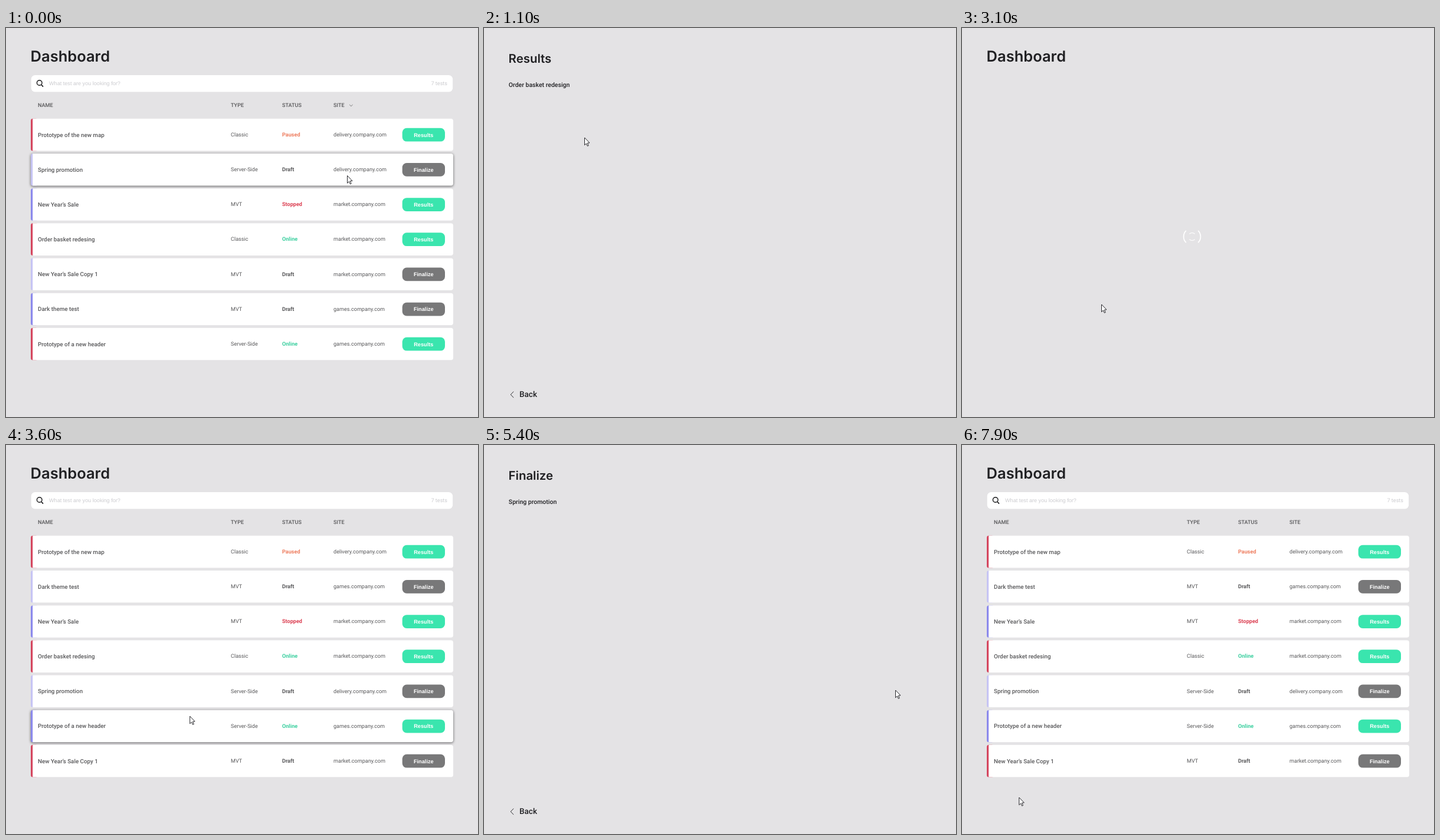
Recreate the animation shown at these times as an HTML page. Size 800 by 660 pixels, loop 8 s.

```html
<!DOCTYPE html>
<html lang="en">
<head>
<meta charset="utf-8">
<title>Dashboard</title>
<style>
  html, body { margin: 0; width: 100%; height: 100%; overflow: hidden; background: #e4e3e5; }
  svg { display: block; width: 800px; height: 660px; }
  text { text-rendering: geometricPrecision; fill: #58585a; font: 400 9.1px Roboto, sans-serif; }
  .title { font: 600 25.5px Inter, sans-serif; fill: #202023; }
  .heading { font: 600 20.4px Inter, sans-serif; fill: #202023; }
  .subject { font-size: 10.5px; font-weight: 500; fill: #222225; }
  .back { font-size: 13.5px; font-weight: 500; fill: #222225; }
  .head { font-weight: 500; }
  .name { font-size: 9.8px; font-weight: 500; }
  .status { font-weight: 600; }
  .label { font: 700 9.2px "Liberation Sans", Arial, sans-serif; fill: #fff; text-anchor: middle; }
  .hint { font: 400 9.1px "Liberation Sans", Arial, sans-serif; fill: #cbcbcf; }
  .count { fill: #cbcbcf; text-anchor: end; }
  .line { fill: none; stroke: #333336; }
  .row { filter: drop-shadow(0 .5px .5px rgba(0,0,0,.06)); }
  .row.hover { filter: drop-shadow(0 1px 2px rgba(0,0,0,.6)); }
  .ring { fill: none; stroke: #fff; stroke-dasharray: 1; }
  .cursor path { fill: #fff; stroke: #1c1c20; stroke-width: .95; stroke-linejoin: round; }
</style>
</head>
<body>
<svg id="stage" viewBox="0 0 800 660"></svg>
<script>
const LOOP = 8000, STEP = 100;
const ROW_TOP = 153.8, ROW_PITCH = 59.17, ROW_HEIGHT = 54.6;
const STRIPES = ['#d5465f', '#c6c4f4', '#8b89ec'];
const STATUS_COLORS = { Paused: '#ee7d5f', Stopped: '#dc4053', Online: '#3bcf9f', Draft: '#58585a' };
const stage = document.getElementById('stage');

const TESTS = {
  map: ['Prototype of the new map', 'Classic', 'Paused', 'delivery'],
  spring: ['Spring promotion', 'Server-Side', 'Draft', 'delivery'],
  sale: ['New Year\u2019s Sale', 'MVT', 'Stopped', 'market'],
  basket: ['Order basket redesing', 'Classic', 'Online', 'market'],
  copy: ['New Year\u2019s Sale Copy 1', 'MVT', 'Draft', 'market'],
  dark: ['Dark theme test', 'MVT', 'Draft', 'games'],
  header: ['Prototype of a new header', 'Server-Side', 'Online', 'games']
};

function add(parent, tag, attrs = {}, content) {
  const el = document.createElementNS('http://www.w3.org/2000/svg', tag);
  for (const key in attrs) el.setAttribute(key, attrs[key]);
  if (content) el.textContent = content;
  parent.append(el);
  return el;
}
const group = (parent, cls = '') => add(parent, 'g', { class: cls });
const text = (parent, cls, x, y, content) => add(parent, 'text', { class: cls, x, y }, content);
const show = (el, on) => { el.style.display = on ? '' : 'none'; };

function makeRow(parent, test, index) {
  const [name, type, status, site] = test;
  const y = ROW_TOP + index * ROW_PITCH;
  const row = group(parent, 'row');
  add(row, 'rect', { x: 42, y, width: 12, height: ROW_HEIGHT, rx: 3.5, fill: STRIPES[index % 3] });
  add(row, 'path', {
    d: `M45.2 ${y}H754q4 0 4 4v${ROW_HEIGHT - 8}q0 4-4 4H45.2z`, fill: '#fff'
  });
  text(row, 'name', 54, y + 30.7, name);
  text(row, '', 381, y + 30.1, type);
  text(row, 'status', 468, y + 30.1, status).style.fill = STATUS_COLORS[status];
  text(row, '', 555, y + 30.1, site + '.company.com');
  const draft = status === 'Draft';
  const button = add(row, 'rect', {
    x: 671.7, y: y + 16, width: 72.3, height: 22.8, rx: 7.5, fill: draft ? '#787879' : '#3ae5ae'
  });
  text(row, 'label', 707.8, y + 30.7, draft ? 'Finalize' : 'Results');
  return { row, button };
}

function makeList(keys, sorted) {
  const list = group(stage);
  add(list, 'rect', { class: 'row', x: 42.6, y: 80, width: 714.6, height: 28.4, rx: 6.5, fill: '#fff' });
  add(list, 'circle', { class: 'line', cx: 56.7, cy: 93, r: 4.3, 'stroke-width': 1.4, style: 'stroke:#161618' });
  add(list, 'path', { class: 'line', d: 'M59.8 96.2l3.2 3.4', 'stroke-width': 1.6, style: 'stroke:#161618' });
  text(list, 'hint', 73, 97.1, 'What test are you looking for?');
  text(list, 'count', 748, 97.1, '7 tests');
  [[54, 'NAME'], [381, 'TYPE'], [468, 'STATUS'], [555, 'SITE']]
    .forEach(([x, label]) => text(list, 'head', x, 134.3, label));
  if (sorted) add(list, 'path', { class: 'line', d: 'M582.2 130l2.7 2.7 2.7-2.7', style: 'stroke:#777' });
  const rows = keys.map((key, i) => makeRow(list, TESTS[key], i));
  return { list, rows };
}

function makeDetail(title, subject) {
  const page = group(stage);
  text(page, 'heading', 41.6, 59, title);
  text(page, 'subject', 41.8, 99.6, subject);
  add(page, 'path', { class: 'line', d: 'M50.2 616.8l-5 5.2 5 5.2' });
  text(page, 'back', 60, 626, 'Back');
  return page;
}

const title = text(stage, 'title', 41.6, 56.6, 'Dashboard');
const sortedList = makeList(['map', 'spring', 'sale', 'basket', 'copy', 'dark', 'header'], true);
const plainList = makeList(['map', 'dark', 'sale', 'basket', 'spring', 'header', 'copy'], false);
const results = makeDetail('Results', 'Order basket redesign');
const finalize = makeDetail('Finalize', 'Spring promotion');

const spinner = group(stage);
spinner.setAttribute('transform', 'translate(390 354)');
const makeRing = width => add(spinner, 'circle', { class: 'ring', pathLength: 4, 'stroke-width': width });
const outerRing = makeRing(1.7), innerRing = makeRing(1.2);

const cursor = group(stage, 'cursor');
const arrow = add(cursor, 'path', { d: 'M.5.5V13.2L3.4 10.5 5.3 14.8 7.2 14 5.3 9.7 9 9.4Z' });
const hand = add(cursor, 'path', {
  d: 'M-1.4 10V1.4A1.3 1.3 0 0 1 1.2 1.4V6.2Q2.4 5 3.6 6.6 4.9 5.7 6 7.2 7.4 6.5 8 8.2V12' +
     'Q8 14 6.6 15.5V17.8H-.6V16Q-3 13.5-4.6 10.2-3.4 8-1.4 10Z'
});

// [time, scene]
const SCENES = [
  [0, 'sorted'], [1000, 'results'], [1400, 'loading'], [3200, 'plain'],
  [5300, 'finalize'], [5800, 'loading'], [7600, 'plain']
];

// [time, x, y]
const PATH = [
  [0, 578, 250], [100, 710.5, 353], [900, 710.5, 353], [1000, 170, 185.5], [1300, 170, 185.5],
  [1400, 72, 628], [2200, 68, 625], [3100, 236, 468.5], [3400, 236, 468.5], [4500, 649.6, 419.8],
  [4700, 697, 415.5], [5700, 697, 415.5], [5800, 79, 625], [6700, 79, 622.5], [7800, 79, 622.5],
  [7900, 96.3, 597.5], [8000, 96.3, 597.5]
];

function pointAt(t) {
  const i = PATH.findIndex(key => key[0] > t);
  const [t0, x0, y0] = PATH[i - 1], [t1, x1, y1] = PATH[i];
  const k = (t - t0) / (t1 - t0);
  return [x0 + (x1 - x0) * k, y0 + (y1 - y0) * k];
}

function poseRing(ring, radius, angle) {
  ring.setAttribute('r', radius);
  // Two quarter arcs facing each other, centred on the given angle.
  ring.setAttribute('transform', `rotate(${angle - 45})`);
}

function spin(elapsed) {
  const angle = (elapsed - 1700) * .4;
  const pulse = Math.cos(angle * Math.PI / 90);
  poseRing(outerRing, 13.2 + 1.2 * pulse, angle);
  poseRing(innerRing, 5.5 + pulse, 90 - (elapsed - 1700) * .257);
}

function render(time) {
  const t = Math.floor(time % LOOP / STEP) * STEP;
  const [start, scene] = SCENES.findLast(([at]) => at <= t);
  show(title, !['results', 'finalize'].includes(scene));
  show(sortedList.list, scene === 'sorted');
  show(plainList.list, scene === 'plain');
  show(results, scene === 'results');
  show(finalize, scene === 'finalize');
  show(spinner, scene === 'loading');
  if (scene === 'loading') spin(t - start);

  const [x, y] = pointAt(t);
  cursor.setAttribute('transform', `translate(${x} ${y})`);
  const onButton = t >= 4400 && t < 5300;
  const pointing = onButton || (t >= 100 && t < 1000);
  show(hand, pointing);
  show(arrow, !pointing);

  const hovered = t >= 3300 ? Math.floor((y - 151) / ROW_PITCH) : -1;
  sortedList.rows.forEach(({ row }, i) => row.classList.toggle('hover', i === 1));
  plainList.rows.forEach(({ row }, i) => row.classList.toggle('hover', i === hovered));
  plainList.rows[4].button.setAttribute('fill', onButton ? '#a3a3a4' : '#787879');
}

const begin = performance.now();
function tick() {
  render(performance.now() - begin);
  requestAnimationFrame(tick);
}
tick();
</script>
</body>
</html>
```
